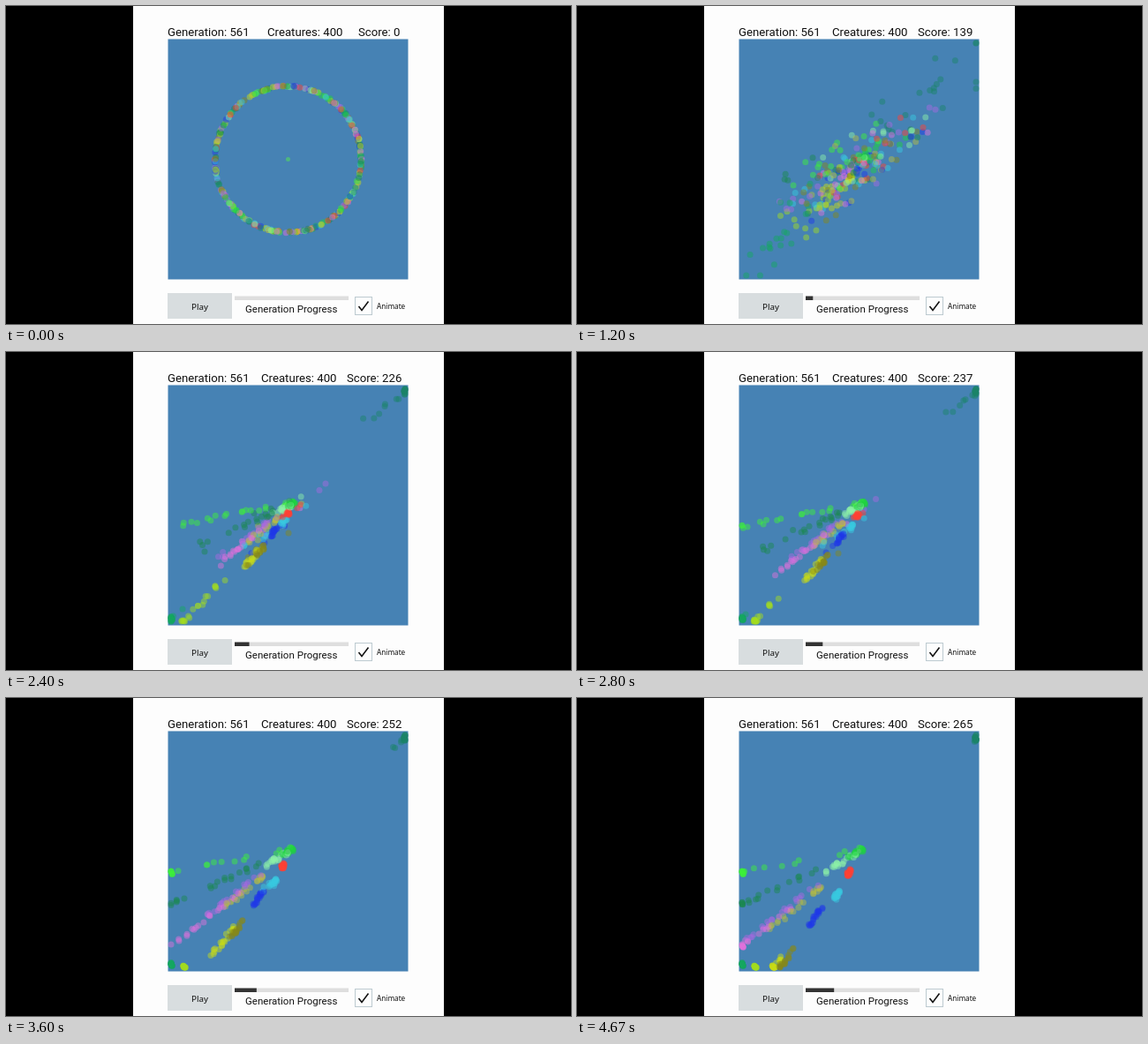
An HTML page with a canvas for the animation above (4.74 s loop, 640x360 px).

```html
<!DOCTYPE html>
<html lang="en">
<head>
<meta charset="utf-8">
<title>Generation Progress</title>
<style>
  html, body { margin: 0; width: 100%; height: 100%; overflow: hidden; background: #000; }
  canvas { display: block; }
</style>
</head>
<body>
<canvas id="stage" width="640" height="360"></canvas>
<script>
const ctx = document.getElementById('stage').getContext('2d');
const LOOP = 4740, FPS = 15, LAST_STEP = 70;
const PER_SPECIES = 20;
const FOOD = { x: 319.5, y: 173.5 };
const RING_RADIUS = 82.5;
const HUB = { x: 328, y: 170 };            // streaks fan out from here
const AXIS = { x: 0.83, y: -0.56 };        // the swarm is drawn out along this diagonal
const WALLS = { left: 187, right: 452, top: 42, bottom: 305 };

// Colour, heading in degrees and speed; the first ones settle soonest
const SPECIES = [
  ['#20d040', 155, 2], ['#c8dc14', 128, 27], ['#3cf038', 169, 24],
  ['#a4dc20', 133, 55], ['#14a860', 137, 100], ['#ff4034', 126, 5],
  ['#8cf0a8', 150, 5], ['#2038e8', 127, 14], ['#85881c', 126, 23],
  ['#b8bc40', 140, 15], ['#e070dc', 142, 25], ['#1c8850', 156, 25],
  ['#38c8e0', 122, 9], ['#a868e0', 143, 18], ['#1c8468', -45, 90]
];

let seed = 561;
const random = () => (seed = (seed * 16807) % 2147483647) / 2147483647;
const clamp = (v, lo, hi) => Math.max(lo, Math.min(hi, v));

function makeCreature([color, heading, speed], index) {
  const spread = clamp((heading - 120) / 50, 0.1, 1);
  const patience = 0.5 + 0.6 * index / SPECIES.length;
  const course = heading * Math.PI / 180;
  const dirX = Math.cos(course), dirY = Math.sin(course);
  const angle = random() * Math.PI * 2;
  const radius = RING_RADIUS + random() * 2 - 1;
  const dx = FOOD.x + radius * Math.cos(angle) - HUB.x;
  const dy = FOOD.y + radius * Math.sin(angle) - HUB.y;
  return {
    color, dirX, dirY,
    speed: speed * (1 + spread * (random() * 2 - 1)),
    reach: Math.min(
      ((dirX < 0 ? WALLS.left : WALLS.right) - HUB.x) / dirX,
      ((dirY < 0 ? WALLS.top : WALLS.bottom) - HUB.y) / dirY),
    along: dx * AXIS.x + dy * AXIS.y,
    across: dy * AXIS.x - dx * AXIS.y,
    growth: random() * 0.4,
    settle: patience * (0.5 + 2.4 * random()),
    jitter: random() * 5 - 2.5,
    order: random()
  };
}

const creatures = SPECIES
  .flatMap((s, i) => Array.from({ length: PER_SPECIES }, () => makeCreature(s, i)))
  .sort((a, b) => a.order - b.order);

function dot(x, y, r, color) {
  ctx.fillStyle = color;
  ctx.beginPath();
  ctx.arc(x, y, r, 0, Math.PI * 2);
  ctx.fill();
}

// Each creature leaves the stretching ring and settles on the streak of its species
function drawCreature(c, t) {
  const run = Math.min(c.speed * t ** 1.25, c.reach);
  const hold = Math.exp(-((t / c.settle) ** 2.5));
  const along = c.along * hold * (1 + (c.growth + 0.15 + 0.004 * c.along) * t);
  const across = c.across * hold * Math.exp(-0.7 * t) + c.jitter * Math.min(t, 1);
  const x = HUB.x + c.dirX * run + along * AXIS.x - across * AXIS.y;
  const y = HUB.y + c.dirY * run + along * AXIS.y + across * AXIS.x;
  dot(clamp(x, WALLS.left, WALLS.right), clamp(y, WALLS.top, WALLS.bottom), 3.5, c.color);
}

const SCORES = [[0.667, 0], [1.2, 139], [2.4, 226], [3.2, 245], [4, 257], [4.667, 265]];

// The score levels off, so it is interpolated over 1 / t
function scoreAt(t) {
  const i = SCORES.findIndex(([time]) => t <= time + 0.001);
  if (i < 1) return 0;
  const [t0, s0] = SCORES[i - 1], [t1, s1] = SCORES[i];
  return Math.round(s0 + (s1 - s0) * (1 / t0 - 1 / t) / (1 / t0 - 1 / t1));
}

function rect(x, y, w, h, color) {
  ctx.fillStyle = color;
  ctx.fillRect(x, y, w, h);
}

function text(str, x, y, font) {
  ctx.font = font + ', sans-serif';
  ctx.fillStyle = '#111';
  ctx.fillText(str, x, y);
}

function drawControls(t) {
  rect(183, 325, 73, 29, '#d8dddf');
  text('Play', 210, 343.5, '9.8px "Noto Sans"');
  rect(259, 328.5, 129, 4.5, '#dedede');
  rect(259, 328.5, 6.9 * t, 4.5, '#333');
  text('Generation Progress', 271, 347, '11.5px Roboto');

  ctx.strokeStyle = '#bccad0';
  ctx.lineWidth = 1;
  ctx.strokeRect(395.5, 329.5, 19, 20);
  ctx.strokeStyle = '#111';
  ctx.lineWidth = 1.6;
  ctx.beginPath();
  ctx.moveTo(399.5, 340);
  ctx.lineTo(403, 344.5);
  ctx.lineTo(410.5, 334.5);
  ctx.stroke();
  text('Animate', 420, 343, '8.2px "Noto Sans"');
}

function draw(t) {
  rect(0, 0, 640, 360, '#000');
  rect(144, 0, 352, 360, '#fdfdfd');

  const score = scoreAt(t), font = '13.2px Roboto';
  text('Generation: 561', 183, 33.5, font);
  text('Creatures: 400', score ? 289 : 296, 33.5, font);
  text('Score: ' + score, score ? 386 : 399, 33.5, font);

  rect(183.5, 37.5, 272, 272, '#4682b4');
  ctx.globalAlpha = 0.48;
  creatures.forEach(c => drawCreature(c, t));
  ctx.globalAlpha = 1;
  dot(FOOD.x, FOOD.y, 2.5, 'rgba(80, 200, 110, 0.75)');
  drawControls(t);
}

function tick() {
  const ms = performance.now() % LOOP;
  const step = Math.min(LAST_STEP, Math.floor((ms + 5) * FPS / 1000));
  draw(step / FPS);
  requestAnimationFrame(tick);
}
tick();
</script>
</body>
</html>
```
